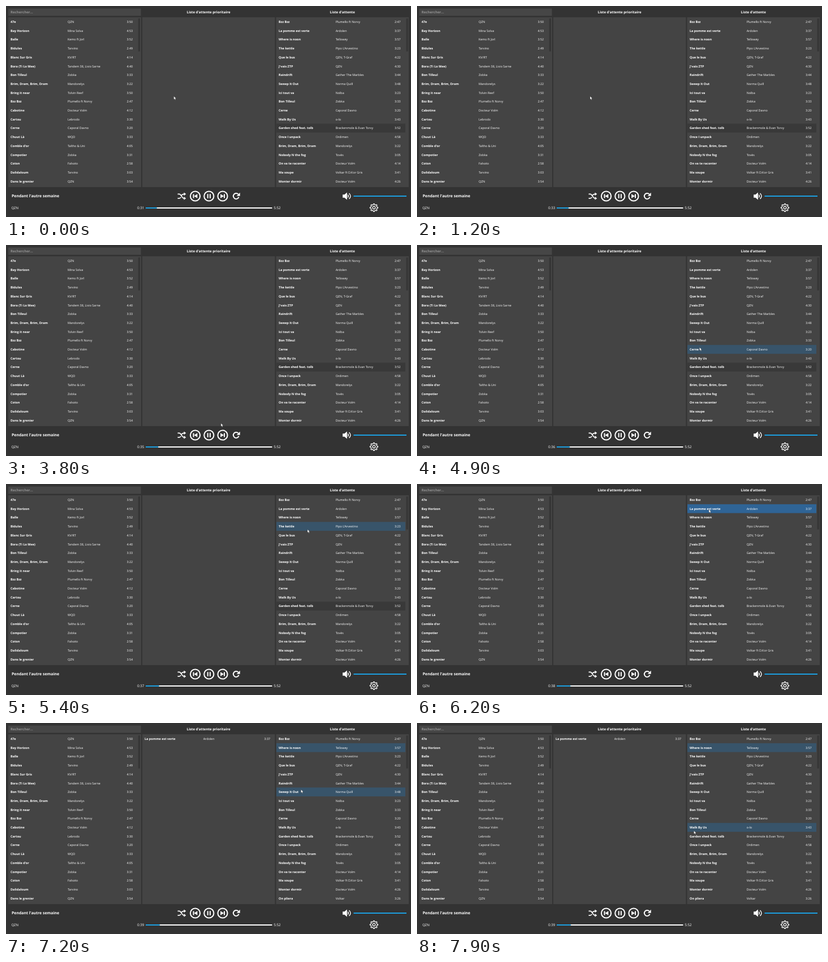
Recreate the animation shown at these times as an HTML page. Size 716 by 374 pixels, loop 8000 ms.

```html
<!DOCTYPE html>
<html lang="fr">
<head>
<meta charset="utf-8">
<style>
html, body { margin: 0; height: 100%; overflow: hidden; background: #333; }
svg { display: block; width: 716px; height: 374px; fill: #fff; font: 5.4px "Open Sans", "Noto Sans", sans-serif; text-rendering: geometricPrecision; }
.b { font-weight: 700; font-size: 5.5px; }
.h { font-weight: 700; font-size: 6.1px; }
.time { font-size: 6.2px; }
.line { fill: none; stroke: #fff; stroke-width: 2; }
</style>
</head>
<body>
<svg viewBox="0 0 716 374">
  <rect x="4" y="4.5" width="234.5" height="13" fill="#464646"/>
  <text class="h" x="8" y="13.2" fill="#929292">Rechercher...</text>
  <text class="h" x="358" y="13.2" text-anchor="middle">Liste d'attente prioritaire</text>
  <text class="h" x="594.7" y="13.2" text-anchor="middle">Liste d'attente</text>
  <g fill="#444">
    <rect x="4" y="20" width="235" height="301"/>
    <rect x="241" y="20" width="234.5" height="301"/>
    <rect x="477.5" y="20" width="234.5" height="301"/>
  </g>
  <g fill="#363636">
    <rect x="233.7" y="22" width="3.3" height="58.5"/>
    <rect x="707.5" y="22" width="3.3" height="58.5"/>
  </g>
  <rect id="picked" x="478" width="228" height="15.7"/>
  <rect id="hover" x="478" width="228" height="15.7" fill="#38546a"/>
  <g id="library"></g>
  <g id="before"></g>
  <g id="after"></g>

  <text class="b" x="10" y="339.4" style="font-size:6.9px">Pendant l'autre semaine</text>
  <text x="9.5" y="359.7" font-size="6">QZN</text>
  <text id="clock" class="time" x="232" y="360"></text>
  <text class="time" x="473.3" y="360">5:52</text>
  <rect x="247" y="357" width="223.5" height="2"/>
  <g fill="#1c9fe0">
    <rect id="bar" x="247" y="357" height="2"/>
    <rect x="614.5" y="336" width="93.5" height="2"/>
  </g>

  <g class="line">
    <path stroke-width="1.8" d="M303.500 333.300h3c3 0 4.500 7.600 8 7.600h1M303.500 340.900h3c1 0 1.900-1 2.500-2M310.300 335.400c1-1.500 2-2.100 4.200-2.100h1"/>
    <circle cx="334.5" cy="337" r="8.6"/>
    <circle cx="358.8" cy="337" r="8.6"/>
    <circle cx="383" cy="337" r="8.6"/>
    <path d="M356.700 333.200v7.600M360.900 333.200v7.600M331.500 333.500v7M386 333.500v7"/>
    <path d="M410.600 333.600a5 5 0 1 0 1 5"/>
    <path style="stroke-width:1.4" d="M604.300 334.500q2 2.500 0 5M606.500 332q5 5 0 10"/>
    <circle cx="650.5" cy="357.5" r="2.3" style="stroke-width:1.2"/>
    <path id="gear" style="stroke-width:1.3" stroke-linejoin="round"/>
  </g>
  <path d="M314.500 330.400l3.800 2.900-3.800 2.900zM314.500 338l3.800 2.900-3.800 2.900zM338.300 333.300v7.400l-5.800-3.700zM379.200 333.300v7.400l5.800-3.700zM413.700 330.800v6h-6zM595.200 334.300h3.200l4.500-3.800v13l-4.500-3.800h-3.200z"/>
  <path id="cursor" d="M0 0v5.600l1.300-1.100 1 2.100 1-.5-1-2h1.700z" stroke="#222" stroke-width=".3"/>
</svg>
<script>
const $ = id => document.getElementById(id);
const ROW = 15.7, TOP = 20.15;

const library = `47e|QZN|3:50
Bay Horizon|Mina Solva|4:53
Balle|Kemo ft Jorl|3:52
Bidules|Tarvino|2:49
Blanc Sur Gris|KV/RT|4:14
Bora (Ti Lo Mee)|Tandem 38, Livio Sarne|4:40
Bon Tilleul|Zobka|3:33
Brim, Dram, Brim, Dram|Mandorelys|3:22
Bring it near|Tolvin Reef|3:50
Bzz Bzz|Plumello ft Norvy|2:47
Cabotine|Docteur Volm|4:12
Cartou|Lebrodo|3:30
Cerne|Caporal Davno|3:20
Chuut Là|WQD|3:33
Comble d'or|Taltho & Uni|4:05
Compotier|Zobka|3:31
Coton|Falsoto|2:58
Dalidaloum|Tarvino|3:03
Dans le grenier|QZN|3:54`.split("\n");

const queue = `Bzz Bzz|Plumello ft Norvy|2:47
La pomme est verte|Ardolen|3:37
Where is noon|Tellowey|3:57
The kettle|Pipo L'Arvestino|3:23
Que le bus|QZN, T-Graf|4:22
J'vais ZTP|QZN|4:30
Raindrift|Gather The Marbles|3:44
Sweep It Out|Norma Quill|3:48
Ici tout va|Nolba|3:23
Bon Tilleul|Zobka|3:33
Cerne|Caporal Davno|3:20
Walk By Us|o-lo|3:43
Garden shed feat. tolb|Brackenmole & Evan Torvy|3:52
Once I unpack|Ordimen|4:58
Brim, Dram, Brim, Dram|Mandorelys|3:22
Nobody N the fog|Tovès|3:05
On va te raconter|Docteur Volm|4:14
Ma soupe|Volkar ft D.Kor Gris|3:41
Monter dormir|Docteur Volm|4:26
On pliera|Volkar|3:26`.split("\n");

const list = (songs, cols) => songs.slice(0, 19).map((song, i) =>
  song.replace("&", "&amp;").split("|").map((s, k) =>
    `<text x="${cols[k]}" y="${30 + i * ROW}"${k ? "" : ' class="b"'}>${s}</text>`).join("")).join("");

const right = [482, 582.7, 687];
$("library").innerHTML = list(library, [8, 109, 213.5]);
$("before").innerHTML = list(queue, right);
$("after").innerHTML = list([queue[1]], [245, 348.7, 456.5]) +
  list(queue.filter((_, i) => i != 1), right);

// Gear outline: eight teeth of four points each
$("gear").setAttribute("d", "M" + Array.from({ length: 32 }, (_, i) => {
  const r = i % 4 < 2 ? 7 : 5.2, a = (i - .5) * Math.PI / 16;
  return `${650.5 + r * Math.cos(a)} ${357.5 + r * Math.sin(a)}`;
}).join("L") + "Z");

// Pointer stops: time, x, y
const path = [
  [0, 296.7, 160], [300, 306, 160], [1400, 306, 160], [1900, 335, 168], [2000, 335, 168],
  [2300, 357, 166], [2500, 370, 178], [2900, 431, 213], [3200, 422, 256], [3800, 380, 316],
  [3900, 381, 315.5], [4400, 381, 315.5], [4900, 499.5, 181.5], [5300, 529, 99],
  [5400, 533, 80.5], [5800, 522, 52], [6200, 516, 45], [6700, 516, 45],
  [7200, 521.5, 118], [7500, 519, 124], [7900, 489.5, 191]
];

function pointer(t) {
  const i = Math.max(1, path.findIndex(p => p[0] >= t));
  const [a, b] = [path[i - 1], path[i]];
  const f = (t - a[0]) / (b[0] - a[0]);
  return [a[1] + (b[1] - a[1]) * f, a[2] + (b[2] - a[2]) * f];
}

const show = (id, on) => $(id).setAttribute("visibility", on ? "visible" : "hidden");
const rowY = i => TOP + i * ROW;

function draw(now) {
  const t = Math.floor(now % 8000 / 100) * 100;
  const [x, y] = pointer(t);
  const clicked = t >= 6200, moved = t >= 6700;
  const picked = clicked ? 1 : 12;
  const over = x > 478 && x < 706 && y < 321 ? Math.floor((y - TOP) / ROW) : -1;

  $("cursor").setAttribute("transform", `translate(${x} ${y})`);
  $("picked").setAttribute("y", rowY(picked));
  $("picked").setAttribute("fill", !clicked ? "#393939" : over == 1 ? "#2f6496" : "#38546a");
  $("hover").setAttribute("y", rowY(over));
  show("hover", over >= 0 && !(clicked && over == picked));
  show("before", !moved);
  show("after", moved);

  const sec = 31 + Math.floor((t + 800) / 1000);
  $("clock").textContent = "0:" + sec;
  $("bar").setAttribute("width", 223.5 * sec / 352);
  requestAnimationFrame(draw);
}
requestAnimationFrame(draw);
</script>
</body>
</html>
```
